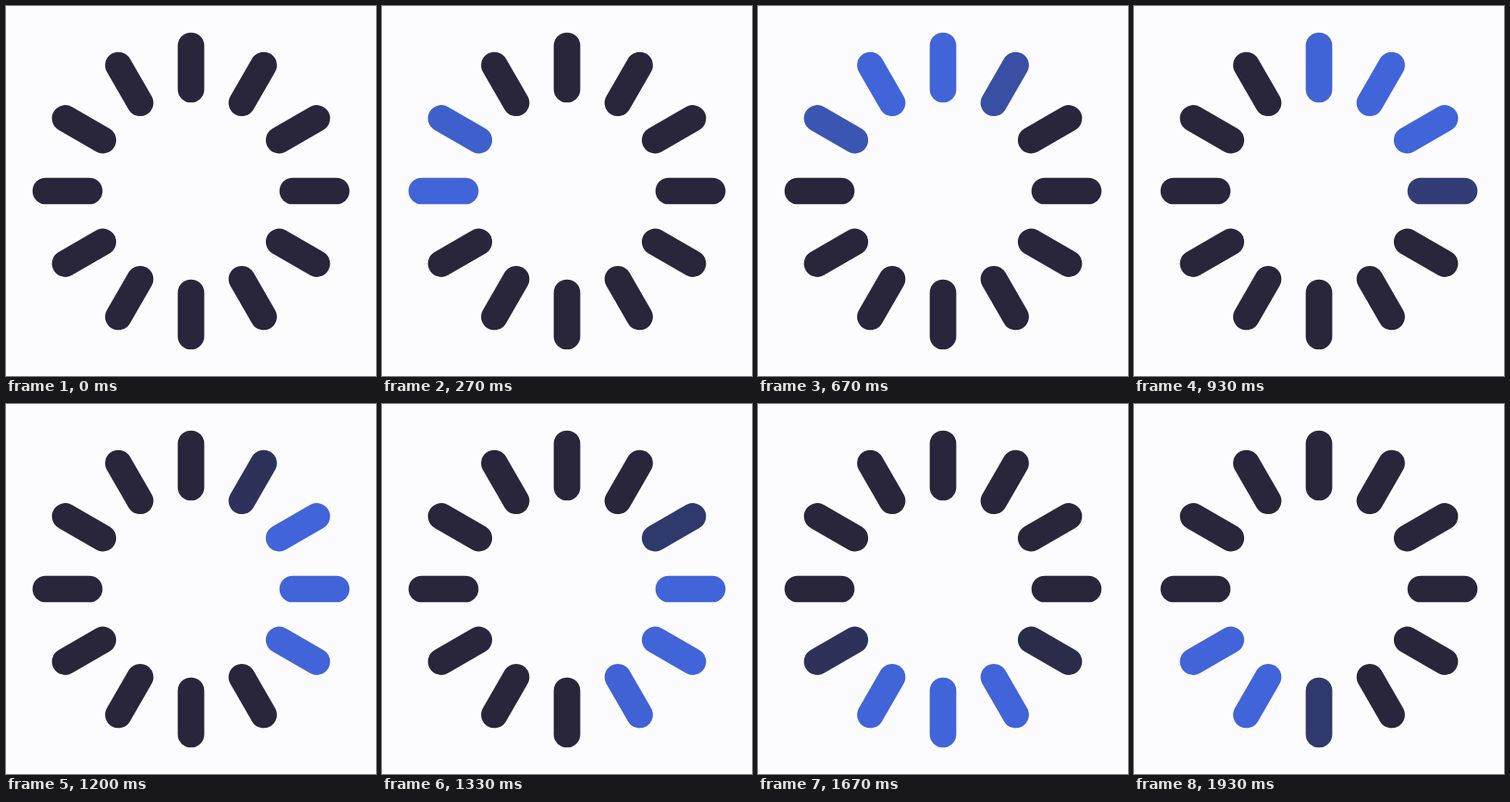
An HTML page for the animation above (2000 ms loop, 400x400 px).

```html
<!DOCTYPE html>
<html lang="en">
<head>
<meta charset="utf-8">
<title>Spinner</title>
<style>
  html, body { margin: 0; width: 100%; height: 100%; overflow: hidden; background: #fcfbfe; }
  svg { display: block; width: 100vw; height: 100vh; }
  line { stroke-width: 28.7; stroke-linecap: round; }
</style>
</head>
<body>
<svg viewBox="-200 -200 400 400"></svg>
<script>
const LOOP = 2000, TICK = 200 / 3, STEP = 150;
const RISE = 160, FALL_START = 480, FALL = 150;
const DARK = [41, 38, 59], BLUE = [65, 100, 217];

const svg = document.querySelector('svg');
const bars = Array.from({ length: 12 }, (_, i) => {
  const bar = document.createElementNS(svg.namespaceURI, 'line');
  bar.setAttribute('x1', -157);
  bar.setAttribute('x2', -110);
  bar.setAttribute('transform', `rotate(${i * 30})`);
  return svg.appendChild(bar);
});

const clamp = x => Math.min(1, Math.max(0, x));

// Quick ease-out rise, hold, then a linear fade
function glow(age) {
  const rise = 1 - (1 - clamp(age / RISE)) ** 2;
  return rise * (1 - clamp((age - FALL_START) / FALL));
}

const mix = k => `rgb(${DARK.map((d, i) => Math.round(d + (BLUE[i] - d) * k))})`;

function draw() {
  // The motion advances at 15 steps per second
  const time = Math.floor((performance.now() % LOOP + 5) / TICK) * TICK % LOOP;
  bars.forEach((bar, i) => bar.setAttribute('stroke', mix(glow(time - i * STEP))));
  requestAnimationFrame(draw);
}
draw();
</script>
</body>
</html>
```
